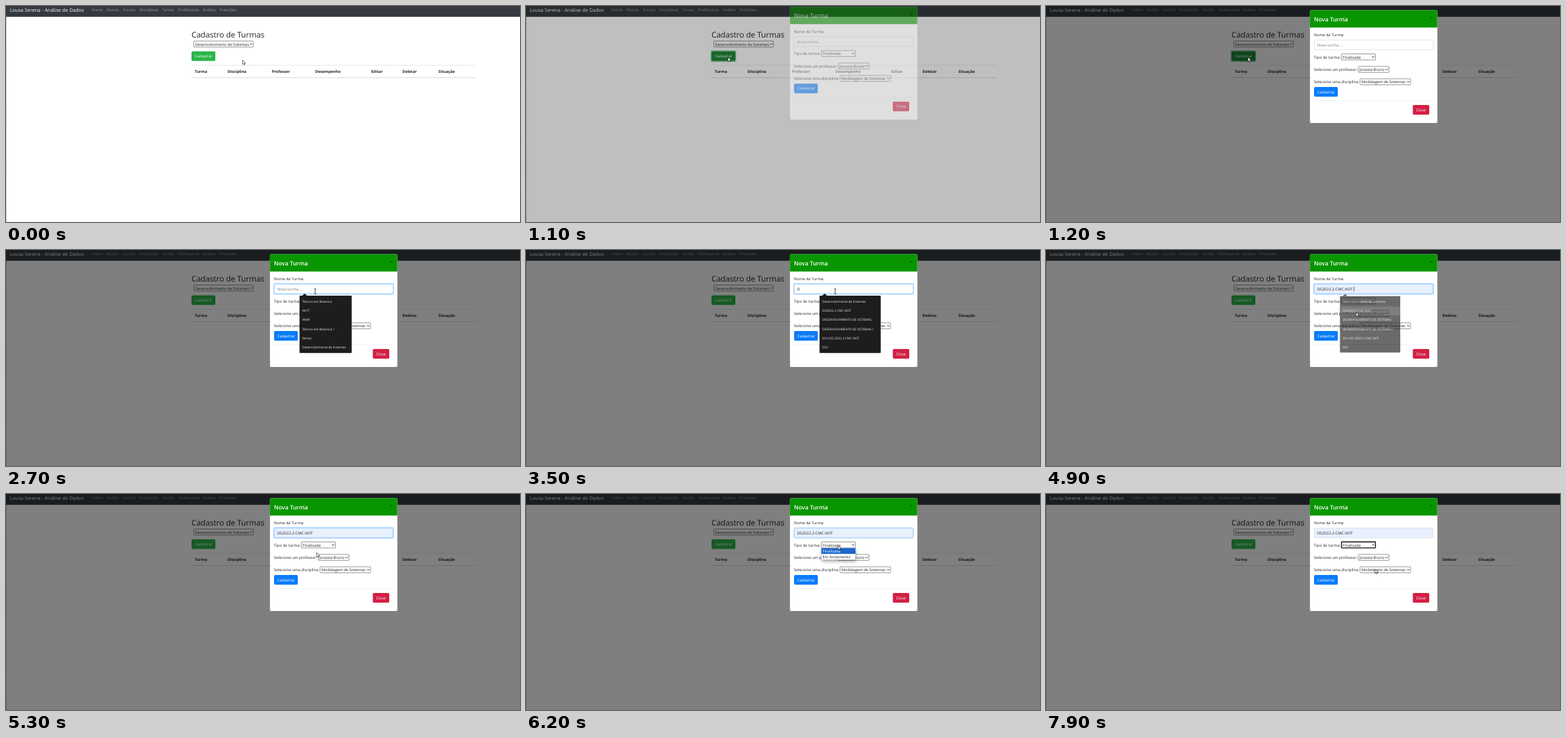
Recreate the animation shown at these times as an HTML page. Size 798 by 336 pixels, loop 8000 ms.

```html
<!DOCTYPE html>
<html lang="pt-BR">
<head>
<meta charset="utf-8">
<title>Cadastro de Turmas</title>
<style>
html, body { margin: 0; width: 100%; height: 100%; overflow: hidden; background: #fff; }
svg { display: block; width: 798px; height: 336px; }
text {
  font: 6px "Open Sans", "Noto Sans", sans-serif;
  fill: #212529; white-space: pre; text-rendering: geometricPrecision;
}
.brand { font-size: 7.6px; fill: #fff; }
.nav { fill: #999ca0; }
.h2 { font-size: 12.1px; }
.th { font-weight: 700; }
.title { font-size: 9px; font-weight: 600; fill: #fff; }
.white { fill: #fff; }
.hint { fill: #6c757d; }
.item { font-size: 4.85px; fill: #eee; }
.preview { font: 5.24px "Liberation Sans", Arial, sans-serif; }
</style>
</head>
<body>
<svg id="stage" viewBox="0 0 798 336"></svg>
<script>
const LOOP = 8000, STEP = 100;
const stage = document.getElementById('stage');

// Pointer track: time, x, y
const track = [
  [200, 367.3, 84], [800, 313.6, 79.6], [1400, 313.6, 79.6], [2000, 509, 64.3],
  [2100, 509, 64.3], [2300, 480, 64.3], [3700, 480, 64.3], [4100, 481.3, 103.6],
  [4400, 481.3, 96.8], [5100, 481.3, 96.8], [5700, 484.4, 80], [6200, 484.4, 80],
  [6600, 481, 90], [6900, 481, 90], [7400, 494, 102], [7600, 494, 102], [7900, 510.8, 116.8]
];
const recent = ['Técnico em Botanica', 'AK77', 'AK89', 'Técnico em Botanica 1', 'Renan',
  'Desenvolvimento de Sistemas'];
const matches = ['Desenvolvimento de Sistemas', 'DS2022.2-CMC.NOT', 'DESENVOLVIMENTO DE SISTEMAS',
  'DESENVOLVIMENTO DE SISTEMAS I', 'DS-LOG-2022.2-CMC.NOT', 'DS2'];

const clamp = v => Math.max(0, Math.min(1, v));
const ramp = (t, from, to) => clamp((t - from) / (to - from));
const within = (t, from, to) => t >= from && t < to;

const text = (x, y, s, cls = '') => `<text x="${x}" y="${y}" class="${cls}">${s}</text>`;
const rect = (x, y, w, h, fill, extra = '') =>
  `<rect x="${x}" y="${y}" width="${w}" height="${h}" fill="${fill}" ${extra}/>`;
const button = (x, y, w, label, fill) =>
  rect(x, y, w, 15, fill, 'rx="1.7"') + text(x + 5, y + 9.7, label, 'white');
const ring = (x, y, w, h, color, opacity) =>
  rect(x - .7, y - .7, w + 1.4, h + 1.4, 'none',
    `rx="2.2" stroke="${color}" stroke-width="1.4" opacity="${opacity}"`);
const select = (x, y, w, label, focused) =>
  rect(x, y, w, 9.4, '#fff', `rx=".8" stroke="${focused ? '#000' : '#666'}" stroke-width="${focused ? 1.3 : .7}"`) +
  text(x + 2, y + 7, label) +
  `<path d="M${x + w - 5.2} ${y + 3.8}l1.7 1.8 1.7-1.8" fill="none" stroke="#111" stroke-width=".9"/>`;

function pointerAt(t) {
  const next = track.findIndex(k => k[0] > t);
  if (next === 0) return track[0].slice(1);
  if (next < 0) return track[track.length - 1].slice(1);
  const [t0, x0, y0] = track[next - 1], [t1, x1, y1] = track[next];
  const p = ramp(t, t0, t1);
  return [x0 + (x1 - x0) * p, y0 + (y1 - y0) * p];
}

function page(t) {
  const active = within(t, 600, 2300);
  const links = [[133, 'Home'], [156, 'Alunos'], [181.5, 'Cursos'], [207, 'Disciplinas'],
    [242.5, 'Turma'], [267, 'Professores'], [305.5, 'Análise'], [331.6, 'Previsões']];
  const heads = [[293, 'Turma'], [344, 'Disciplina'], [412.7, 'Professor'], [480, 'Desempenho'],
    [567, 'Editar'], [615.5, 'Deletar'], [671.3, 'Situação']];
  return rect(0, 0, 798, 336, '#fff') +
    '<path d="M.5 17V336" stroke="#e59aae" stroke-dasharray="2 1"/>' +
    rect(0, 0, 798, 16.8, '#343a40') +
    text(6, 9.2, 'Lousa Serena - Análise de Dados', 'brand') +
    links.map(([x, s]) => text(x, 8.4, s, 'nav')).join('') +
    text(288, 48.7, 'Cadastro de Turmas', 'h2') +
    select(291.5, 54.5, 92.6, 'Desenvolvimento de Sistemas') +
    (within(t, 800, 2300) ? ring(288, 70.5, 37, 15, '#28a745', .5) : '') +
    button(288, 70.5, 37, 'Cadastrar', active ? '#218838' : '#2cb549') +
    rect(288, 91.8, 441.5, .6, '#d5d9dd') +
    heads.map(([x, s]) => text(x, 104.3, s, 'th')).join('') +
    rect(288, 111, 441.5, .9, '#d3dadd');
}

function field(t, row) {
  const focus = ramp(t, 2200, 2400) * (1 - ramp(t, 6100, 6300));
  const filled = t >= 3800;
  let value = text(421, 63, 'Nova turma ...', 'hint');
  if (t >= 4900) value = text(421, 63, 'DS2022.2-CMC.NOT');
  else if (filled && row >= 0) value = text(421, 62.8, matches[row], 'preview');
  else if (t >= 3000) value = text(421, 63, 'D');
  const caret = within(t, 4900, 5300) || within(t, 5800, 6200);
  return ring(416.4, 53, 184.6, 15, '#007bff', .28 * focus) +
    rect(416.4, 53, 184.6, 15, filled ? '#e8f0fe' : '#fff',
      `rx="1.7" stroke="${focus > .4 ? '#80bdff' : '#ced4da'}" stroke-width=".7"`) +
    value + (caret ? rect(477.8, 57, .6, 7.5, '#111') : '');
}

function suggestions(t, row) {
  const shown = ramp(t, 2200, 2400) * (1 - ramp(t, 4800, 5060) * .9);
  if (!shown || t >= 5100) return '';
  const items = t < 3100 ? recent : matches;
  const w = t < 3100 ? 81 : 95;
  const scale = t >= 4900 ? .985 : 1;
  return `<g opacity="${shown}" transform="translate(503 115.5) scale(${scale}) translate(-503 -115.5)">` +
    rect(455.7, 71, w, 89.2, '#1d1d1d', 'rx="1"') +
    '<path d="M459.7 71.2l4-3.4 4 3.4z" fill="#1d1d1d"/>' +
    (row >= 0 ? rect(455.7, 73 + row * 14.3, w, 14.3, '#3a3a3a') : '') +
    items.map((s, i) => text(460, 81.8 + i * 14.3, s, 'item')).join('') + '</g>';
}

function options() {
  return '<g filter="url(#soft)">' + rect(459, 87, 53, 18, '#000', 'opacity=".35"') + '</g>' +
    rect(458.7, 84.2, 52.8, 18, '#fff', 'stroke="#999" stroke-width=".4"') +
    rect(458.7, 84.2, 52.8, 9, '#1b67cc') +
    text(460.5, 91, 'Finalizada', 'white') + text(460.5, 99.8, 'Em Andamento');
}

function modal(t, y) {
  const m = ramp(t, 1000, 1200);
  if (!m) return '';
  const row = within(t, 3800, 5100) && y > 73 ? Math.floor((y - 73) / 14.3) : -1;
  return rect(0, 0, 798, 336, '#000', `opacity="${.5 * ramp(t, 1050, 1150)}"`) +
    `<g opacity="${m}" transform="translate(0 ${-21 * (1 - m) ** 2})">` +
    rect(409.8, 6.4, 197.8, 175.6, '#fff', 'rx="2"') +
    '<path d="M409.8 33.4V8.4a2 2 0 0 1 2-2h193.8a2 2 0 0 1 2 2v25z" fill="#089600"/>' +
    text(416, 23.6, 'Nova Turma', 'title') +
    '<path d="M596 16.3l4 4m0-4l-4 4" stroke="#044b00" stroke-width=".9"/>' +
    text(416, 47, 'Nome da Turma:') + field(t, row) +
    text(416, 81.6, 'Tipo de turma:') + select(458.7, 74.5, 52.8, 'Finalizada', t >= 7100) +
    text(416, 101, 'Selecione um professor:') + select(485, 93.9, 47.4, 'Jocasta Bruno') +
    text(416, 120.3, 'Selecione uma disciplina:') + select(487.7, 113.2, 78.3, 'Modelagem de Sistemas') +
    button(416.2, 126, 36.8, 'Cadastrar', '#0a7cfb') +
    rect(416, 147.2, 185, .6, '#e3e6e9') +
    button(569.5, 154, 25.5, 'Close', '#d22045') +
    (within(t, 6200, 7100) ? options() : '') +
    suggestions(t, row) + '</g>';
}

function pointer(t, x, y) {
  if (within(t, 3000, 3500)) return '';
  const typing = t > 1400 && x > 416 && y > 53 && y < 68;
  const shape = typing
    ? '<path d="M-1.3-3.8H1.3M0-3.8V3.8M-1.3 3.8H1.3" stroke="#111" stroke-width=".8"/>'
    : '<path d="M0 0V6.6L1.5 5.3 2.6 7.6 3.7 7.1 2.7 4.9H4.7Z" fill="#fff" stroke="#000" stroke-width=".6"/>';
  return `<g transform="translate(${x} ${y})">${shape}</g>`;
}

const defs = '<defs><filter id="soft" x="-30%" y="-60%" width="160%" height="260%">' +
  '<feGaussianBlur stdDeviation="2.5"/></filter></defs>';
let last = -1;

function frame() {
  const t = Math.floor(performance.now() % LOOP / STEP) * STEP;
  if (t !== last) {
    last = t;
    const [x, y] = pointerAt(t);
    stage.innerHTML = defs + page(t) + modal(t, y) + pointer(t, x, y);
  }
  requestAnimationFrame(frame);
}
frame();
</script>
</body>
</html>
```
